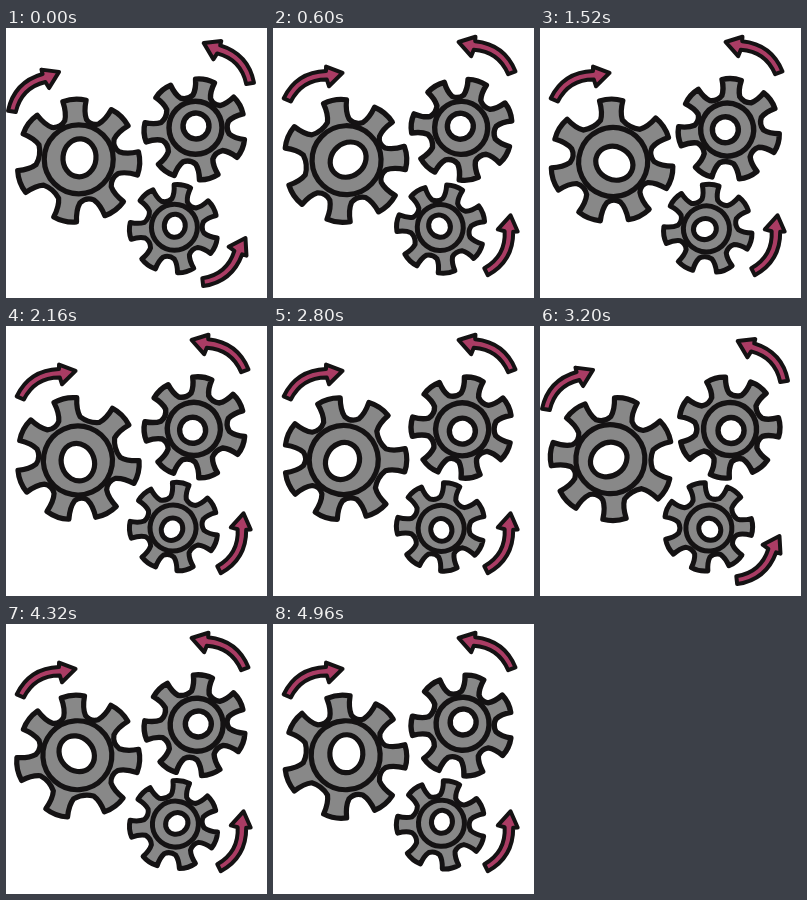
An HTML page with a canvas that plays this animation: 261x270 px, repeating every 5000 ms.

```html
<!DOCTYPE html>
<html lang="en">
<head>
<meta charset="utf-8">
<title>Turning gears</title>
<style>
html, body { margin: 0; overflow: hidden; background: #fff; }
canvas { display: block; }
</style>
</head>
<body>
<canvas id="stage" width="261" height="270"></canvas>
<script>
const ctx = document.getElementById('stage').getContext('2d');
const LOOP = 5000, STEP = 40;
const INK = '#141213', GREY = '#888', PINK = '#aa3c64';
const TEETH = 7, PITCH = 360 / TEETH;
const rad = deg => deg * Math.PI / 180;

// Angles in degrees; skew gives the hand-drawn teeth their uneven spacing.
const gears = [
  { x: 72, y: 132.8, r: 63, valley: 39, hub: 34.5, hole: [16.5, 19], line: 5.2, dir: 1,
    phase: 2.5, axle: [1.5, -3], skew: [0, -1, -3, 3, 9, 7, 3] },
  { x: 189, y: 101.5, r: 52, valley: 32, hub: 26.5, hole: [13, 13], line: 5.4, dir: -1,
    phase: 22.5, axle: [1, -3.5], skew: [0, 0, 0, 0, 2, 2, 0] },
  { x: 168, y: 200.8, r: 45.5, valley: 28, hub: 23, hole: [10.5, 11.5], line: 5, dir: -1,
    phase: 23, axle: [0.8, -3], skew: [0, 0, 0, 0, 2, 1, 0] }
];

// Each pose is tail x, tail y, heading; the arrows jump between the two.
const arrows = [
  { bend: 1, poses: [[4, 85, -40], [12, 73, -26]] },
  { bend: -1, poses: [[246, 57, -139], [241, 46, -150]] },
  { bend: -1, poses: [[195, 256, -46], [212, 246, -66.5]] }
];

function tracePolar(method, ...points) {
  ctx[method](...points.flatMap(([r, deg]) => [r * Math.cos(rad(deg)), r * Math.sin(rad(deg))]));
}

function paint(fill) {
  ctx.fillStyle = fill;
  ctx.fill();
  ctx.stroke();
}

function drawGear(g, turn) {
  const toothAngle = i => g.phase + i * PITCH + g.skew[i % TEETH];
  const tip = g.r * 0.97, waist = g.r * 0.78, root = g.valley * 1.08;
  ctx.save();
  ctx.translate(g.x, g.y);
  ctx.rotate(g.dir * turn * 2 * Math.PI);
  ctx.lineWidth = g.line;

  ctx.beginPath();
  for (let i = 0; i < TEETH; i++) {
    const a = toothAngle(i), next = toothAngle(i + 1);
    tracePolar(i ? 'lineTo' : 'moveTo', [tip, a - 11]);
    tracePolar('quadraticCurveTo', [g.r * 1.01, a], [tip, a + 11]);
    tracePolar('quadraticCurveTo', [waist, a + 10], [root, a + 15]);
    tracePolar('quadraticCurveTo', [g.valley * 0.95, (a + next) / 2], [root, next - 15]);
    tracePolar('quadraticCurveTo', [waist, next - 10], [tip, next - 11]);
  }
  ctx.closePath();
  paint(GREY);

  const [ax, ay] = g.axle;
  ctx.beginPath();
  ctx.arc(ax / 2, ay / 2, g.hub, 0, 2 * Math.PI);
  ctx.stroke();
  ctx.beginPath();
  ctx.ellipse(ax, ay, ...g.hole, 0.1, 0, 2 * Math.PI);
  paint('#fff');
  ctx.restore();
}

function drawArrow({ bend, poses }, pose) {
  const [x, y, heading] = poses[pose];
  ctx.save();
  ctx.translate(x, y);
  ctx.rotate(rad(heading));
  ctx.scale(1, bend);
  ctx.lineWidth = 4;
  ctx.beginPath();
  ctx.moveTo(0, -3);
  ctx.quadraticCurveTo(23, -21, 50, -9);
  ctx.lineTo(52, -13);
  ctx.lineTo(64, 0);
  ctx.lineTo(46, 6);
  ctx.lineTo(47, -1);
  ctx.quadraticCurveTo(25, -12, 5, 3);
  ctx.closePath();
  paint(PINK);
  ctx.restore();
}

function draw() {
  const time = Math.floor(performance.now() % LOOP / STEP) * STEP;
  const pose = time % (LOOP / 8) < 265 ? 0 : 1;
  ctx.clearRect(0, 0, 261, 270);
  ctx.strokeStyle = INK;
  ctx.lineJoin = 'round';
  gears.forEach(g => drawGear(g, time / LOOP));
  arrows.forEach(a => drawArrow(a, pose));
  requestAnimationFrame(draw);
}
draw();
</script>
</body>
</html>
```
